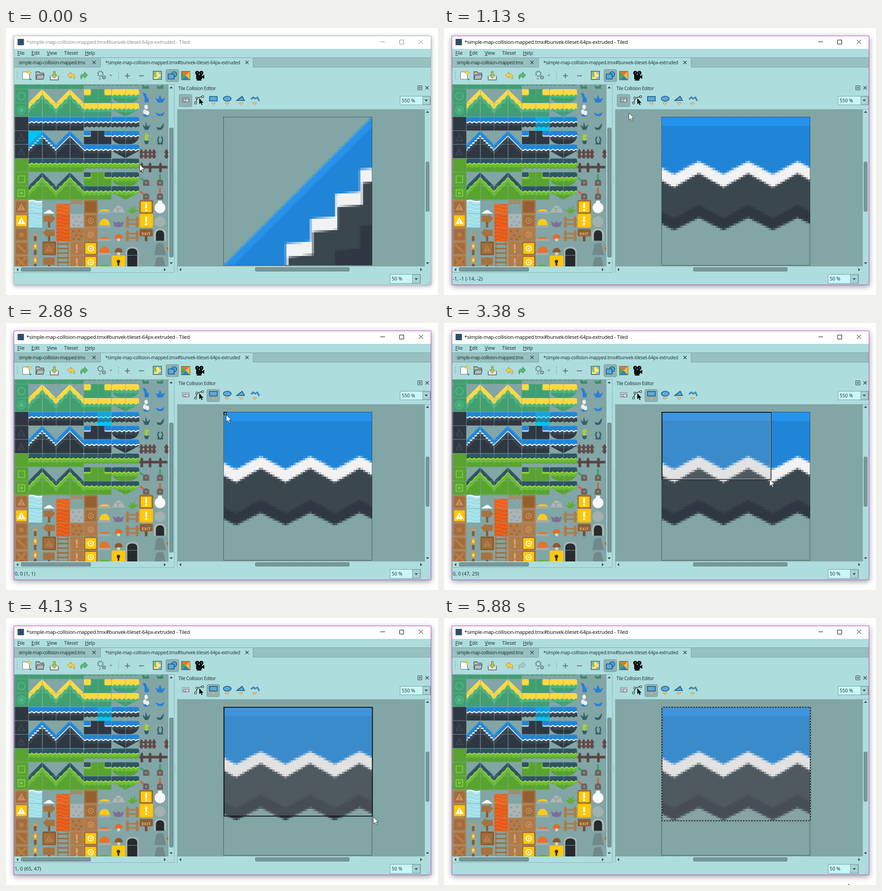
These frames come from a looping animation (952x589 px, 6 s). An HTML page with a canvas:

```html
<!DOCTYPE html>
<html lang="en">
<head>
<meta charset="utf-8">
<title>Tile Collision Editor</title>
<style>
html, body { margin: 0; width: 100%; height: 100%; overflow: hidden; background: #fff; }
svg, canvas, #win { position: absolute; left: 0; top: 0; }
#win { left: 17px; top: 17px; width: 918px; height: 548px; border: 1px solid #a3b9b9; background: #aedddd; box-shadow: 0 2px 9px rgba(0,0,0,.36); }
.on #win { border-color: #b24fd0; box-shadow: 0 3px 12px rgba(0,0,0,.42); }
#tiles { left: 18px; top: 125px; }
.pv { left: 480px; top: 196px; width: 327px; height: 327px; image-rendering: pixelated; }
text { font: 10px "Open Sans", "Noto Sans", sans-serif; letter-spacing: -.3px; fill: #1c2a2b; }
.menu text { font-size: 10.5px; letter-spacing: -.15px; }
.num { font-size: 10.5px; letter-spacing: 0; }
#status { font-size: 11px; letter-spacing: 0; }
.title { fill: #8b8b8b; color: #8b8b8b; font-size: 11px; letter-spacing: -.18px; }
.on .title { fill: #000; color: #000; }
.u { text-decoration: underline; }
.btn { fill: #8eb2b3; stroke: #789b9d; }
.thumb { fill: #76989a; stroke: #627f81; }
.line { fill: none; stroke: #333f40; }
.blue { fill: #5aa9dc; stroke: #17567f; stroke-width: 1.6; }
</style>
</head>
<body>
<div id="win"></div>
<svg width="952" height="589">
  <defs>
    <path id="down" d="M-3.5-2h7l-3.5 4z" fill="#33484a"/>
    <path id="tip" d="M-4.500-2h9l-4.500 4z" fill="#ffd08a" stroke="#d9802b"/>
    <path id="x" d="M-3.5-3.5l7 7m0-7l-7 7" stroke="#2c3c3d" stroke-width="1.2"/>
    <path id="grip" d="M0-8v17" stroke="#7fa6a7" stroke-width="2" stroke-dasharray="1.5 3"/>
    <path id="undoArrow" d="M136 104l7-7v4c7 0 11 5 7 12 0-4-3-6-7-6v4z"/>
  </defs>
  <!-- title, menu, tabs -->
  <path d="M18 18h918v28H18z" fill="#fff"/>
  <path d="M25.500 24h14v14h-14z" fill="#2e4d6b"/>
  <text class="title" x="45" y="35">*simple-map-collision-mapped.tmx#bunvek-tileset-64px-extruded - Tiled</text>
  <path class="title" style="fill:none" stroke="currentColor" d="M825 30.500h10M867.500 26.500h9v9h-9zM910 26l9 9m0-9l-9 9"/>
  <g class="menu">
    <text x="25" y="59"><tspan class="u">F</tspan>ile</text>
    <text x="56" y="59"><tspan class="u">E</tspan>dit</text>
    <text x="90" y="59"><tspan class="u">V</tspan>iew</text>
    <text x="128" y="59">Tileset</text>
    <text x="174" y="59"><tspan class="u">H</tspan>elp</text>
  </g>
  <path d="M18 65h918v22H18z" fill="#97c0c0"/>
  <path d="M18 65.500h191V87M545 65.500h391M18 86.500h191m336 0h391" class="line" style="stroke:#7ca4a5"/>
  <path d="M209 65h336v23H209z" fill="#aedddd"/>
  <path d="M208.500 87V65.500h336V87" class="line" style="stroke:#7ca4a5"/>
  <text x="28" y="80" style="letter-spacing:-.4px">simple-map-collision-mapped.tmx</text>
  <text x="219" y="80" style="letter-spacing:-.18px">*simple-map-collision-mapped.tmx#bunvek-tileset-64px-extruded</text>
  <use href="#x" x="194" y="76"/><use href="#x" x="531" y="76"/>
  <!-- main toolbar -->
  <use href="#grip" x="25" y="105"/><use href="#grip" x="248" y="105"/>
  <path d="M36.500 97h15v16h-15z" fill="#fff" stroke="#667273"/>
  <path d="M51 93l1.500 4 4 1.500-4 1.500-1.500 4-1.500-4-4-1.500 4-1.500z" fill="#ffd83c" stroke="#d9a618" stroke-width=".7"/>
  <use href="#down" transform="translate(54 114) scale(.7)"/>
  <path d="M66 113V96.500h7l2 3h8v4M66 113l3-9.500h15l-2 9.500z" fill="#b5bcbc" stroke="#454f50" stroke-width="1.3"/>
  <path d="M97.500 105.500v9h18v-9" fill="#e4e8e4" stroke="#566263" stroke-width="1.5"/>
  <path d="M106.500 111l-6-7h4v-8h4v8h4z" fill="#c5cb4e" stroke="#697339"/>
  <use href="#undoArrow" fill="#f5cf4c" stroke="#b58c27"/>
  <use id="redo" href="#undoArrow" transform="matrix(-1 0 0 1 316 0)"/>
  <g fill="none" stroke="#67898c"><circle cx="208" cy="101" r="5" stroke-width="1.5"/><circle cx="208" cy="101" r="6" stroke-width="2.500" stroke-dasharray="2 2.700"/><circle cx="216" cy="109" r="3" stroke-width="2.500"/><circle cx="207" cy="112" r="2"/></g>
  <use href="#down" x="231" y="105" opacity=".4"/>
  <path d="M262 105.500h11m-5.500-5.500v11M293 105.500h11" stroke="#61787b" stroke-width="2"/>
  <path d="M324.500 95.500h18v18h-18z" fill="#ffe36b" stroke="#28567c" stroke-width="1.500"/>
  <path d="M326 97h6l-2 5 4 3-3 3h-5z" fill="#82bd58"/><path d="M335 97h6v6zM333 112l8-6v6z" fill="#70bde6"/>
  <path d="M333 98v14m-6-7h14" stroke="#fff" stroke-dasharray="2 2"/>
  <rect class="btn" x="352.500" y="91.500" width="28" height="27" rx="3"/>
  <circle class="blue" cx="370.500" cy="102" r="5.500"/><path class="blue" d="M357.500 101.500h13v11h-13z"/>
  <path d="M386 95h20l-10 10z" fill="#ef6c2f"/><path d="M406 95v20l-10-10z" fill="#f4be32"/><path d="M406 115h-20l10-10z" fill="#307fc6"/><path d="M386 115V95l10 10z" fill="#56a744"/>
  <path d="M386.500 95.500h19v19h-19z" class="line" style="stroke:#6c6540"/>
  <path d="M419 103h13v10h-13zM431 107l6-4v9l-6-3zM422 112h7l2 4h-11z" fill="#111"/><circle cx="421.500" cy="99" r="4.500"/><circle cx="430.500" cy="99" r="4.500"/><circle cx="421.500" cy="99" r="1.300" fill="#889"/><circle cx="430.500" cy="99" r="1.300" fill="#889"/>
  <!-- panels -->
  <path d="M18 125h340v401H18zM377 179h546v347H377z" fill="#82a5a5"/>
  <path d="M18 124.500h353v415H18M377.500 540V179.500H936" class="line" style="stroke:#8ab2b3"/>
  <rect id="selBack" width="30.550" height="30.550" fill="#04c4f3"/>
  <g class="thumb">
    <rect x="360.500" y="220.500" width="8" height="285" rx="2"/><rect x="33.500" y="528.500" width="153" height="8" rx="2"/>
    <rect x="925.500" y="295.500" width="7" height="109" rx="2"/><rect x="549.500" y="528.500" width="207" height="8" rx="2"/>
  </g>
  <use href="#down" x="364" y="519"/><use href="#down" x="929" y="519"/>
  <use href="#down" transform="translate(364 131) scale(1 -1)"/><use href="#down" transform="translate(929 185) scale(1 -1)"/>
  <use href="#down" transform="translate(25 533) rotate(90)"/><use href="#down" transform="translate(384 533) rotate(90)"/>
  <use href="#down" transform="translate(350 533) rotate(-90)"/><use href="#down" transform="translate(915 533) rotate(-90)"/>
  <path d="M374 324v18" stroke="#7ea5a6" stroke-dasharray="2 2"/>
  <text x="380" y="137">Tile Collision Editor</text>
  <path d="M907.500 127.500h9v9h-9zM910.500 130.500h3v3h-3z" class="line"/><use href="#x" x="928" y="132"/>
  <!-- collision tools -->
  <rect id="tool" class="btn" y="146.500" width="28" height="27" rx="3"/>
  <path d="M388.500 153.500h15v10h-15z" fill="none" stroke="#8b4f80" stroke-dasharray="2 1"/>
  <path d="M391 157h5v5h-5z" fill="#e4d9d9" stroke="#666"/><circle cx="399" cy="160" r="3.500" fill="#ddd" stroke="#666"/>
  <path d="M418 166l3-11 11-4" class="line" stroke-width="1.500"/>
  <path d="M415.500 163.500h4v4h-4zM418.500 152.500h4v4h-4zM431.500 149.500h4v4h-4z" fill="#cfe6e6" stroke="#222"/>
  <path d="M426 155v13l3-3 2 5 2-1-2-4h4z"/>
  <path class="blue" d="M448.500 151h17v10h-17z"/><ellipse class="blue" cx="487.500" cy="156" rx="8.500" ry="5.500"/><path class="blue" d="M508.500 160l12-9.500 5 9.500z"/>
  <path d="M540 157l5-4 4 3 5-3 4 8" fill="none" stroke="#17567f" stroke-width="3"/><path d="M540 157l5-4 4 3 5-3 4 8" fill="none" stroke="#4ba6e0" stroke-width="1.500"/>
  <use href="#tip" x="457" y="167"/><use href="#tip" x="487" y="167"/><use href="#tip" x="518" y="167"/><use href="#tip" x="548" y="167"/>
  <!-- zoom boxes -->
  <g fill="#c9f7f7" stroke="#7a9fa1"><path d="M868.500 150.500h67v19h-67zM846.500 543.500h67v20h-67z"/><path d="M918.500 151h16v18h-16zM895.500 544h17v19h-17z" fill="#a6d4d5"/></g>
  <use href="#down" x="926" y="160"/><use href="#down" x="904" y="554"/>
  <text class="num" x="872" y="164">550 %</text><text class="num" x="850" y="557">50 %</text>
  <path d="M928 564l6-6m-3 6l3-3" stroke="#85abad" stroke-dasharray="1 1"/>
</svg>
<canvas id="tiles" width="340" height="401"></canvas>
<canvas id="slopeView" class="pv" width="64" height="64"></canvas>
<canvas id="stripView" class="pv" width="64" height="64"></canvas>
<svg width="952" height="589">
  <rect id="selFront" width="30.550" height="30.550" fill="#04c4f3" opacity=".5"/>
  <text x="309" y="456.500" text-anchor="middle" style="font-weight:700;font-size:9px;fill:#e3b47b;letter-spacing:.2px">EXIT</text>
  <rect x="479.500" y="196.500" width="327" height="327" fill="none" stroke="#222" stroke-dasharray="2 1.500"/>
  <g id="shape" fill="none">
    <rect class="area" x="480.500" y="197" fill="rgba(160,160,164,.2)" stroke="#111" stroke-width="1.800"/>
    <path id="edge" stroke="#a0a0a4" stroke-width="1.500"/>
    <rect id="dash" class="area" x="480.500" y="197" stroke="#fff" stroke-width=".9" stroke-dasharray="3 3"/>
  </g>
  <text id="status" x="19" y="557"></text>
  <path id="cursor" d="M.5.500v15.500l3.600-3.300 2.500 5.900 2.400-1-2.500-5.700h4.800z" fill="#fff" stroke="#222" stroke-width=".8"/>
</svg>
<script>
const $ = id => document.getElementById(id);
const P = 30.55, colX = c => 18.6 + P * c, rowY = r => 135 + P * (r - 1);
let g;

// drawing helpers; one tile is 64 units
const fill = (col, d) => { g.fillStyle = col; g.fill(new Path2D(d)); };
const stroke = (col, d, w = 4) => { g.strokeStyle = col; g.lineWidth = w; g.stroke(new Path2D(d)); };
const box = (col, x, y, w, h, r = 0) => { g.fillStyle = col; g.beginPath(); g.roundRect(x, y, w, h, r); g.fill(); };
const oval = (col, x, y, rx, ry = rx) => { g.fillStyle = col; g.beginPath(); g.ellipse(x, y, rx, ry, 0, 0, 7); g.fill(); };
const ring = (col, x, y, r, w = 4) => { g.strokeStyle = col; g.lineWidth = w; g.beginPath(); g.arc(x, y, r, 0, 7); g.stroke(); };
const at = (c, r, draw, ...args) => {
  g.save(); g.translate(colX(c), rowY(r)); g.scale(P / 64, P / 64); draw(...args); g.restore();
};

const sand = { top: '#ffd941', hi: '#ffdf55', line: '#ffd941', mid: '#4bb484', low: '#419f70', ico: '#54b889' };
const ice = { top: '#2085d6', hi: '#2592ec', line: '#f2f2f2', mid: '#3a474f', low: '#2f3842', ico: '#45525c' };
const grass = { top: '#2d5562', hi: '#34606c', line: '#a9da39', mid: '#6abb39', low: '#59a330', ico: '#7bcb48' };

const zig = (w, v, p) => Array.from({ length: 6 * w + 3 }, (_, k) => `${-5.4 + k * 32 / 3} ${k % 2 ? v : p}`);
const band = (col, w, a, b) => fill(col, 'M' + [...zig(w, ...a), ...zig(w, ...b).reverse()].join('L') + 'Z');

// each layer overlaps the one under it, so no seams show
function strip(t, w, outline, deep) {
  g.clip(new Path2D(outline));
  if (deep) box(t.low, 0, 0, 64 * w, 64);
  band(t.low, w, [40, 34], [49, 43.5]);
  band(t.mid, w, [28, 22], [43.7, 38]);
  box(t.top, 0, 0, 64 * w, 20);
  band(t.top, w, [18, 18], [27, 21]);
  box(t.hi, 0, 0, 64 * w, 4);
  band(t.line, w, [24.8, 19.2], [30.6, 24.3]);
}
const rounded = w => `M0 64V12Q0 0 12 0H${64 * w - 12}Q${64 * w} 0 ${64 * w} 12V64Z`;

function diag(col, d, wob = 0) {
  let s = 'M0 128';
  for (let x = 0; x <= 64; x += 4) s += `L${x} ${64 - x + d + wob * Math.sin(x * .29)}`;
  fill(col, s + 'V128Z');
}
// treads rise slightly to the right
function stair(col, y, dx) {
  const step = 32 / 3;
  let s = 'M-30 200';
  for (let i = 7; i >= 0; i--) {
    const x = 58.8 - step * i + dx, top = y + step * i;
    s += `L${x} ${top + 1}L${x + step} ${top}`;
  }
  fill(col, s + 'V200Z');
}
function slope(t, steps, wob) {
  g.clip(new Path2D('M0 0H64V128H0Z'));
  diag(t.hi, 0); diag(t.top, 4.3);
  if (steps) { stair(t.line, 21.7, 0); stair(t.mid, 27.4, 1); stair(t.low, 46, 0); }
  else { diag(t.line, 22, wob); diag(t.mid, 27, wob); diag(t.low, 46, wob * 1.5); }
}
const mirror = (...a) => { g.translate(64, 0); g.scale(-1, 1); slope(...a); };
function caps(t) {
  box(t.low, 0, 0, 128, 64);
  for (const x of [0, 96]) {
    box(t.mid, x ? 92 : 0, 0, 36, 32, 8);
    box(t.line, x, 0, 32, 27, 6); box(t.top, x, 0, 32, 22, 5);
  }
}
function terrain(t, r, steps, wob) {
  for (const [c, w] of [[1, 4], [5, 2], [7, 2]]) at(c, r, strip, t, w, rounded(w), c < 2);
  for (const c of [1, 3]) {
    at(c, r + 1, slope, t, steps && c < 2, wob);
    at(c + 1, r + 1, mirror, t, steps && c < 2, wob);
  }
  at(5, r + 1, caps, t);
  at(5, r + 2, strip, t, 2, 'M0 0H128V64H0Z', 1);
  at(7, r + 1, strip, t, 2, 'M0 10Q0 0 12 0H116Q128 0 128 10V26Q118 62 82 62H46Q10 62 0 26Z', 1);
  at(7, r + 2, strip, t, 2, 'M0 10Q0 0 12 0H116Q128 0 128 10V28L64 63 0 28Z', 1);
  for (const i of [0, 1, 2]) at(0, r + i, box, t.low, 0, 0, 64, 64);
}

const wood = '#b47d49', dark = '#a26d3c', deep = '#8b5a2f', gold = '#ffc80a', grey = '#a3abab';
const crate = (a = dark, b = wood) => { box(b, 0, 0, 64, 64, 5); box(a, 7, 7, 50, 50, 3); };
const bang = (a, b, ink) => { crate(a, b); box(ink, 28, 13, 8, 25, 2); oval(ink, 32, 47, 5); };
const tri = (a, b, ink, hole) => { crate(a, b); fill(ink, 'M32 16L51 48H13Z'); box(hole, 30, 27, 4, 11); box(hole, 30, 41, 4, 4); };
const coin = (a, b, ink) => { crate(a, b); ring(ink, 32, 32, 12, 4); oval(ink, 32, 32, 4); };
const knob = (col, h) => { box(grey, 0, 52, 62, 12, 4); fill(col, `M8 52Q10 ${50 - h} 32 ${50 - h}T56 52Z`); };
const torch = lit => { box(deep, 26, 38, 12, 24, 3); box('#c99a62', 21, 28, 22, 10, 3); if (lit) { oval('#f7902a', 32, 18, 9, 13); oval('#ffdf4c', 32, 22, 5, 8); } };
const sign = d => { box(deep, 27, 10, 10, 54); fill('#a87140', d); };
const ladder = () => { box(wood, 5, 0, 7, 64); box(wood, 52, 0, 7, 64); for (const y of [8, 29, 50]) box(dark, 5, y, 54, 7); };
const posts = (col, xs, y, rail) => { for (const x of xs) fill(col, `M${x} 64V${y + 6}l6-8 6 8V64Z`); for (const ry of rail) box(col, xs[0] - 4, ry, xs[xs.length - 1] - xs[0] + 20, 7); };
const liquid = (col, wave, y) => { box(col, 0, y, 64, 64 - y); for (let k = y + 8; k < 62; k += 17) stroke(wave, `M0 ${k}q16-10 32 0t32 0`, 3); };
const shroom = col => { box('#e8d5b5', 27, 46, 12, 18, 3); fill(col, 'M14 50Q16 30 33 30T52 50Z'); };
const lever = (col, d) => { stroke(col, d, 8); fill('#6d5f5a', 'M18 62V44Q18 34 32 34T46 44V62Z'); oval('#8d7f79', 32, 48, 6); };
const plank = d => { crate(); stroke(wood, d, 11); };
const stone = () => fill('#72898a', 'M6 62L14 14 24 8H46L60 62Z');

function drawTiles() {
  g = $('tiles').getContext('2d');
  g.translate(-18, -125);
  terrain(sand, 0, 0, 3); terrain(ice, 3, 1, 0); terrain(grass, 6, 0, 1.5);
  // side blocks
  at(0, 1, ring, sand.ico, 32, 32, 17); at(0, 2, ring, sand.ico, 32, 32, 18); at(0, 2, oval, sand.ico, 32, 32, 11);
  at(0, 4, stroke, ice.ico, 'M32 18L47 46H17Z', 3); at(0, 5, stroke, ice.ico, 'M32 18L47 46H17ZM32 29v9', 3);
  at(0, 7, stroke, grass.ico, 'M17 17H47V47H17Z'); at(0, 8, stroke, grass.ico, 'M17 17H47V47H17Z', 5); at(0, 8, box, grass.ico, 26, 26, 12, 12);
  // plants, fences, levers
  at(9, 0, fill, '#398f67', 'M16 62L12 40 30 52 42 44 46 62Z'); at(10, 0, fill, '#398f67', 'M20 62L16 46 30 52 46 42V62Z');
  at(9, 1, fill, '#267fd8', 'M25 60V40L16 16 30 20 40 46 44 34V60Z'); at(10, 1, fill, '#267fd8', 'M22 62L10 40 24 46 32 26 40 46 56 40 44 62Z');
  at(9, 2, fill, '#267fd8', 'M16 54H48L40 63H24Z');
  for (const [x, y] of [[26, 40], [38, 46], [32, 18]]) at(9, 2, oval, '#eee', x, y, 8, 11);
  at(10, 2, fill, '#267fd8', 'M10 44L32 52 54 42 44 60H24Z');
  at(9, 3, fill, '#315f6a', 'M26 60L14 36 28 46 30 22 38 46 52 34 42 60Z'); at(10, 3, fill, '#315f6a', 'M22 60L16 48 34 50 50 28Q50 54 36 60Z');
  at(9, 4, fill, '#a4d32f', 'M28 46Q22 24 30 14L48 22 36 34 46 38 36 48Z'); at(9, 4, fill, '#315f6a', 'M22 46H46L40 62H28Z');
  at(10, 4, stroke, '#315f6a', 'M28 58Q16 40 28 28M38 58Q50 40 38 28M20 60H46', 6);
  at(9, 5, posts, '#654848', [4, 24, 44, 62], 22, [32, 50]); at(10, 5, posts, '#654848', [56], 22, [32, 50]);
  at(9, 6, posts, '#594444', [6, 44, 92], 20, [34]); at(9, 6, box, '#594444', 0, 34, 130, 12);
  at(9, 7, lever, '#31a46f', 'M28 42L4 26'); at(10, 7, lever, '#31a46f', 'M32 40V8');
  at(9, 8, lever, '#d95d40', 'M28 42L4 24'); at(10, 8, lever, '#d95d40', 'M32 40V8');
  // crates and signs
  at(0, 9, tri, dark, wood, '#c59361', dark); at(0, 10, tri, gold, wood, '#fff', gold);
  at(0, 11, plank, 'M22 25L42 40M40 24L24 42'); at(0, 12, plank, 'M12 14L52 50'); at(0, 13, plank, 'M12 12L52 52M52 12L12 52');
  at(1, 9, liquid, '#9fdfe8', '#c6f0f3', 4); at(1, 9, stroke, '#fff', 'M0 5q16-8 32 0t32 0', 5); at(1, 10, liquid, '#9fdfe8', '#b9eaf0', 0);
  at(1, 11, torch); at(1, 12, torch, 1); at(1, 13, torch, 1);
  at(2, 9, fill, '#fff', 'M4 63Q14 56 22 50T40 48Q48 58 60 63Z');
  at(2, 10, sign, 'M6 8H40V0L60 22 40 44V36H6Z'); at(2, 11, sign, 'M58 10H24V2L4 24 24 46V38H58Z');
  at(2, 12, tri, dark, deep, wood, dark); at(2, 13, sign, 'M4 10H58V44H4Z');
  at(3, 9, liquid, '#e8621e', '#f27a35', 18);
  for (const r of [10, 11]) at(3, r, liquid, '#e8621e', '#d54f13', 0);
  for (const r of [12, 13]) at(3, r, ladder);
  for (const x of [10, 30, 50]) at(4, 9, ring, wood, x, 10, 7, 5);
  [['#a9b5b4', '#95a3a3'], ['#b37b49', '#9d6936']].forEach(([a, b], i) => {
    at(4, 10 + i, box, a, 0, 0, 64, 64, 5);
    for (const [x, y] of [[10, 12], [38, 10], [24, 32], [48, 36], [12, 48], [36, 50]]) at(4, 10 + i, box, b, x, y, 10, 8, 2);
  });
  for (const r of [12, 13]) { at(4, r, bang, '#b37b49', wood, '#d3a777'); at(5, r, coin, gold, dark, '#fff'); }
  at(5, 9, crate, '#94602f', '#aa713d');
  at(5, 10, coin, dark, wood, '#c18f5c'); at(5, 11, coin, '#b37b49', '#b37b49', '#c8986a');
  // buttons and small things
  at(6, 9, knob, '#ffca1c', 7); at(6, 10, knob, '#ffca1c', 27); at(6, 11, knob, '#eb7029', 7); at(6, 12, knob, '#eb7029', 27); at(6, 13, knob, '#62b337', 7);
  at(7, 9, fill, '#aeb6b6', 'M2 58L18 32 32 24 50 34 62 58Z'); at(7, 9, stroke, '#8b9697', 'M18 34L30 42 46 36M30 42V56', 3);
  at(7, 10, fill, '#806e96', 'M6 34L22 42 32 34 42 42 58 34 50 58 32 62 14 58Z');
  at(7, 11, shroom, '#e76928'); at(7, 12, shroom, '#8c5730');
  at(7, 13, crate, gold, gold); at(7, 13, oval, '#333', 32, 28, 8); at(7, 13, box, '#333', 28, 30, 8, 18);
  at(8, 9, fill, '#5ead35', 'M26 62L8 46 26 48 22 30 34 42 46 24 44 46 60 44 40 62Z');
  for (const r of [10, 11]) at(8, r, posts, '#b17a47', [4, 48], 12, [24, 44]);
  at(8, 12, fill, '#aab3b4', 'M2 64V46Q4 24 32 24T62 46V64Z'); at(8, 12, fill, '#262b2e', 'M9 64V48Q12 32 32 32T55 48V64Z');
  at(8, 13, box, '#aab3b4', 2, 0, 60, 64); at(8, 13, box, '#262b2e', 9, 0, 46, 64);
  for (const r of [9, 10]) at(9, r, bang, gold, r < 10 ? '#9b6735' : '#ffbd0a', '#fff');
  at(9, 11, box, '#765031', 26, 20, 12, 44); at(9, 11, box, '#8e5f35', 1, 6, 62, 34, 4);
  at(10, 9, oval, '#fafafa', 32, 36, 25); at(10, 9, box, '#fafafa', 23, 3, 18, 14, 4); at(10, 10, oval, '#a3b1b1', 32, 36, 25);
  at(10, 11, fill, '#b1b8b8', 'M4 60V28Q6 4 32 4T60 28V60Z'); at(10, 11, fill, '#262b2e', 'M13 60V30Q14 12 32 12T51 30V60Z');
  at(10, 12, stone); at(10, 13, stone); at(11, 12, oval, '#e8621e', 3, 32, 6);
  // grid
  g.globalCompositeOperation = 'destination-out';
  g.globalAlpha = .7;
  g.fillStyle = '#000';
  for (let i = 0; i < 14; i++) {
    if (i < 10) g.fillRect(Math.round(colX(i)), 125, 1, 401);
    g.fillRect(18, Math.round(rowY(i)) - 1, i < 10 ? 276 : 340, 1);
  }
}
drawTiles();
g = $('slopeView').getContext('2d'); slope(ice, 1, 0);
g = $('stripView').getContext('2d'); strip(ice, 1, 'M0 0H64V64H0Z');

// pointer path: time, x, y
const path = `0 294 300|130 290 290|250 276 266|380 254 238|500 233 215|630 220 205|750 220 205|880 262 201|1000 342 194|1130 407 187
1250 432 167|1380 450 161|1500 460 157|1630 466 155|1750 468 156|1880 469 157|2000 470 160|2130 480 169|2250 491 182|2380 486 191|2500 480 196|2630 481 196
2880 485 202|3000 520 218|3130 590 260|3250 660 305|3380 717 344|3510 742 372|3630 768 395|3750 791 416|3880 801 428|4000 807 434
4130 809 438|4250 811 443|4380 810 447|4500 808 449|4630 805 449|5500 806 451|5630 819 486|5750 858 545|5880 891 586`
  .split(/[|\n]/).map(s => s.split(' ').map(Number));
const cell = 327 / 64, areas = document.querySelectorAll('.area');

function render(t) {
  const [now, x, y] = path.findLast(p => p[0] <= t);
  const active = t >= 750, done = t >= 5500;
  const px = Math.round((x - 478.5) / cell), py = Math.round((y - 197) / cell);
  document.body.classList.toggle('on', active);
  $('slopeView').style.display = active ? 'none' : '';
  $('stripView').style.display = active ? '' : 'none';
  for (const id of ['selBack', 'selFront']) {
    $(id).setAttribute('x', colX(active ? 6 : 1));
    $(id).setAttribute('y', rowY(active ? 3 : 4));
  }
  $('tool').setAttribute('x', t < 1750 ? 381.5 : 442.5);
  $('redo').setAttribute('fill', done ? '#a5cccc' : '#5bbd72');
  $('redo').setAttribute('stroke', done ? '#86a9aa' : '#2f8750');
  $('cursor').setAttribute('transform', `translate(${x} ${y})`);

  const inView = x > 377 && x < 923 && y > 179 && y < 526;
  $('status').textContent = inView ? `${Math.floor((x - 480) / 327)}, ${Math.floor((y - 196) / 327)} (${px}, ${py})` : '';

  const w = (done ? 64 : Math.min(64, px)) * cell, h = (done ? 49 : py) * cell;
  $('shape').style.display = now >= 2880 ? '' : 'none';
  $('dash').style.display = done ? '' : 'none';
  if (now >= 2880) {
    for (const a of areas) { a.setAttribute('width', w); a.setAttribute('height', h); }
    $('edge').setAttribute('d', w < 327 ? `M${479.5 + w} 198V${196 + h}H481` : '');
  }
}
function tick() {
  render(performance.now() % 6000);
  requestAnimationFrame(tick);
}
tick();
</script>
</body>
</html>
```
